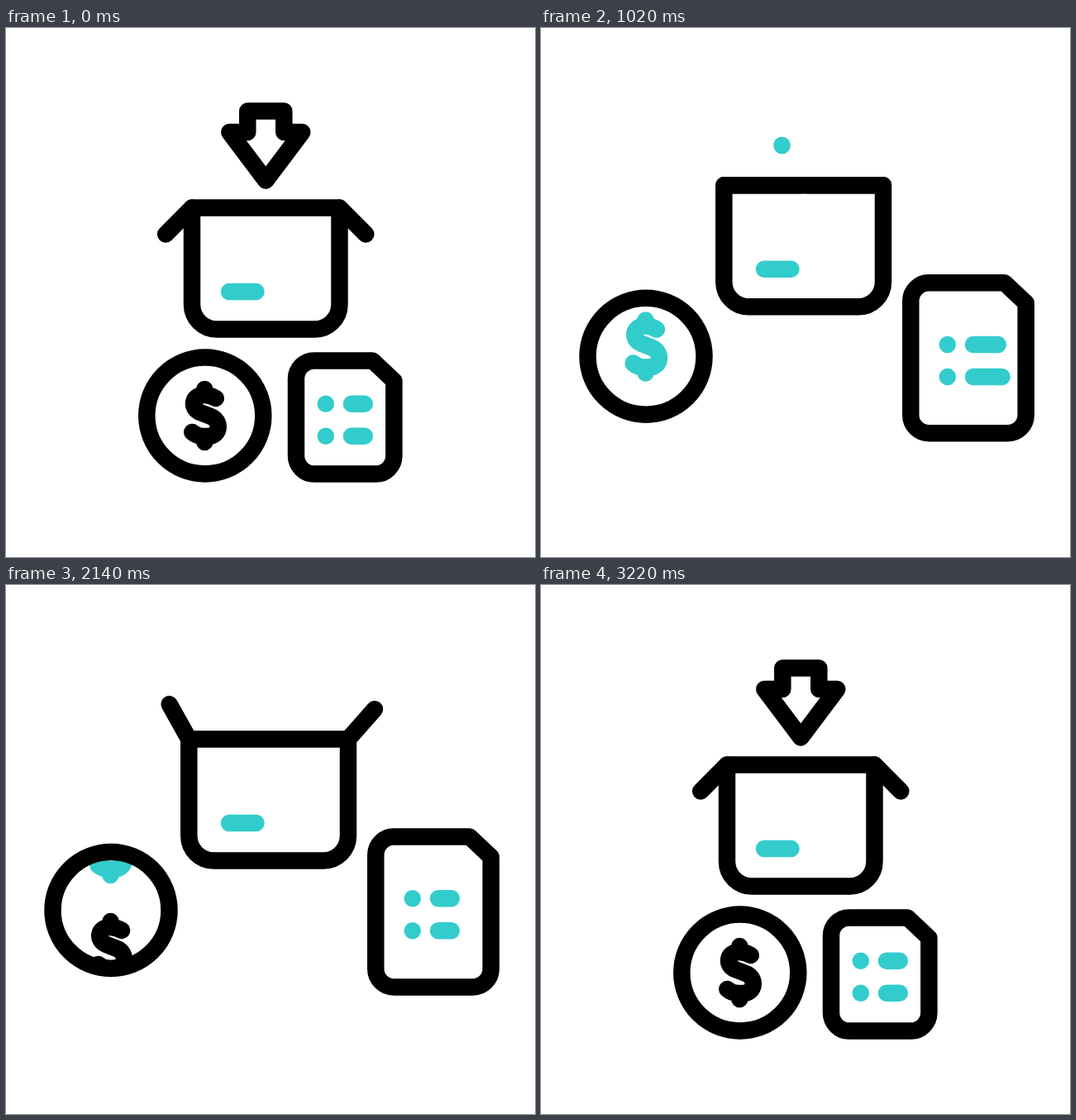
Write an HTML page with a canvas that moves like this. It is 640 px wide and 640 px high and loops after 3360 ms.

```html
<!DOCTYPE html>
<html lang="en">
<head>
<meta charset="utf-8">
<title>Packing a box</title>
<style>
html, body { margin: 0; width: 100%; height: 100%; overflow: hidden; background: #fff; }
canvas { display: block; }
</style>
</head>
<body>
<canvas id="stage" width="640" height="640"></canvas>
<script>
const ctx = document.getElementById('stage').getContext('2d');
const LOOP = 3360, INK = '#000', TEAL = '#33cccc', LINE = 20.5;
let now = 0;

const mix = (a, b, p) => a + (b - a) * p;
const part = (from, to) => Math.min(1, Math.max(0, (now - from) / (to - from)));

// Eased 0 to 1 between two times
const ramp = (from, to) => (1 - Math.cos(Math.PI * part(from, to))) / 2;

// Eased up, then down again
const bump = (from, peak, to) => ramp(from, peak) - ramp(peak, to);

function line(points, color = INK, closed = false) {
  ctx.strokeStyle = color;
  ctx.beginPath();
  points.forEach(([x, y]) => ctx.lineTo(x, y));
  if (closed) ctx.closePath();
  ctx.stroke();
}

function circle(x, y, r) {
  ctx.beginPath();
  ctx.arc(x, y, r, 0, 2 * Math.PI);
}

function drawArrow(rim) {
  if (now > 510 && now < 2402) return;
  const dy = now < 1500
    ? 256 * ramp(340, 510) - 56 * ramp(160, 340)
    : 220 * (ramp(2402, 3062) - 1);
  const half = [[22, 0], [22, 25.5], [44, 25.5]];
  const mirror = half.map(([x, y]) => [-x, y]).reverse();
  ctx.save();
  ctx.beginPath();
  ctx.rect(0, 0, 640, rim);
  ctx.clip();
  ctx.translate(314.3, 100.5 + dy);
  line([...half, [0, 84], ...mirror], INK, true);
  ctx.restore();
}

// A streak grows downwards, then its tail catches up
function drawStreak(x, y, length, start, grown, fall, end) {
  if (now < start || now > end) return;
  const tail = y + length * ramp(fall, end);
  const head = y + length * ramp(start, grown);
  line([[x, tail], [x, head + 0.1]], TEAL);
}

function drawBox(lift, open) {
  const left = mix(225, 221.3, open), right = mix(403.5, 414, open);
  const top = 217.6 + lift, bottom = top + 147, r = 30;

  ctx.strokeStyle = INK;
  ctx.beginPath();
  ctx.moveTo(left, top);
  ctx.arcTo(left, bottom, left + r, bottom, r);
  ctx.arcTo(right, bottom, right, bottom - r, r);
  ctx.lineTo(right, top);
  ctx.closePath();
  ctx.stroke();

  const size = 45 + 48 * (ramp(440, 760) - ramp(1860, 2200));
  const flap = (x, side, shut, unfold) => {
    const a = 1.25 * Math.PI * (1 - ramp(shut, 960) + ramp(unfold, unfold + 580));
    line([[x, top], [x + side * size * Math.cos(a), top - size * Math.sin(a)]]);
  };
  flap(left, 1, 450, 1840);
  flap(right, -1, 470, 1820);

  const label = 32.5 + 69.5 * (ramp(1090, 1420) - ramp(1500, 1900));
  line([[270, top + 101.4], [270 + label, top + 101.4]], TEAL);
}

function drawDollar(x, y, color) {
  ctx.save();
  ctx.translate(x, y);
  ctx.strokeStyle = color;
  ctx.beginPath();
  ctx.moveTo(13, -21);
  ctx.bezierCurveTo(8, -24, 4, -25, -1, -25);
  ctx.bezierCurveTo(-16, -25, -18, -9, -6, -4);
  ctx.lineTo(7, 1);
  ctx.bezierCurveTo(20, 6, 19, 25, 3, 25);
  ctx.lineTo(-2, 25);
  ctx.bezierCurveTo(-8, 25, -12, 23, -15.5, 20);
  for (const end of [-32, 26]) {
    ctx.moveTo(-0.5, end);
    ctx.lineTo(-0.5, end + 6);
  }
  ctx.stroke();
  ctx.restore();
}

function drawCoin(lift, apart, open) {
  const x = mix(240.8, 127, apart), y = 469 + lift - 44.5 * open, r = 70.5;
  const turn = p => 231 * (p + 0.05 * Math.sin(Math.PI * p));
  const roll = turn(part(540, 1540)) + turn(part(1540, 2320));
  ctx.save();
  circle(x, y, r);
  ctx.clip();
  for (let i = 0; i < 5; i++) {
    const odd = i % 2;
    drawDollar(x, y + 115.5 * i - 4.5 * odd - roll, odd ? TEAL : INK);
  }
  ctx.restore();
  ctx.strokeStyle = INK;
  circle(x, y, r);
  ctx.stroke();
}

function drawSheet(lift, apart, open) {
  const grow = ramp(420, 697) - ramp(2395, 2943);
  const x = mix(410.2, 517, apart), y = 471 + lift - 44.5 * open;
  const w = mix(59.2, 69.7, grow), h = mix(68.6, 91, grow), r = 22;
  const left = x - w, right = x + w, top = y - h, bottom = y + h;

  ctx.strokeStyle = INK;
  ctx.beginPath();
  ctx.moveTo(right - 26, top);
  ctx.arcTo(left, top, left, bottom, r);
  ctx.arcTo(left, bottom, right, bottom, r);
  ctx.arcTo(right, bottom, right, top, r);
  ctx.lineTo(right, top + 24.5);
  ctx.closePath();
  ctx.stroke();

  const row = (rowY, lag) => {
    const first = 386.8 + 105 * apart;
    const extra = bump(760 + lag, 1090 + lag, 1560 + lag) + bump(1560 + lag, 1820, 2080);
    ctx.fillStyle = TEAL;
    circle(first, rowY, LINE / 2);
    ctx.fill();
    line([[first + 31.2, rowY], [first + 47 + 21 * extra, rowY]], TEAL);
  };
  row(y - 16.3, 60);
  row(y + 22.7, 0);
}

function draw() {
  const lift = 28.5 * ramp(420, 610) - 59.5 * ramp(610, 1100) + 31 * ramp(2606, 2902);
  const apart = ramp(420, 640) - ramp(2395, 2940);
  const open = ramp(420, 697) - ramp(2340, 2740);

  ctx.fillStyle = '#fff';
  ctx.fillRect(0, 0, 640, 640);
  ctx.lineWidth = LINE;
  ctx.lineCap = ctx.lineJoin = 'round';
  drawStreak(291.5, 69.5 + lift, 100, 480, 800, 800, 1030);
  drawStreak(343.5, 105.5 + lift, 61, 440, 640, 700, 940);
  drawArrow(217.6 + lift);
  drawBox(lift, open);
  drawCoin(lift, apart, open);
  drawSheet(lift, apart, open);
}

const start = performance.now();
function tick() {
  now = (performance.now() - start) % LOOP;
  draw();
  requestAnimationFrame(tick);
}
tick();
</script>
</body>
</html>
```
